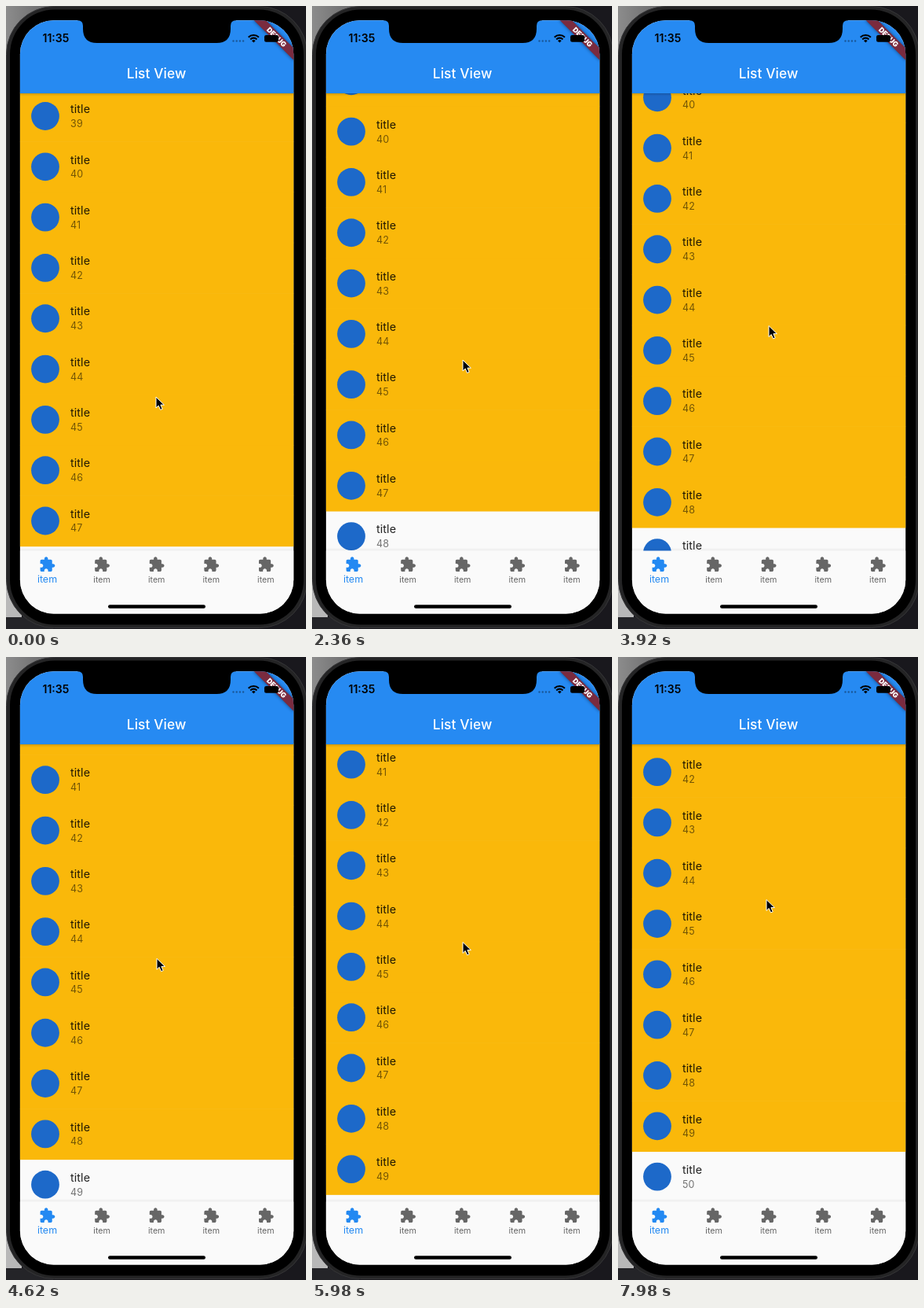
Recreate the animation shown at these times as an HTML page. Size 382x792 px, loop 8 s.

```html
<!DOCTYPE html>
<html lang="en">
<head>
<meta charset="utf-8">
<title>List View</title>
<style>
  html, body { margin: 0; width: 100%; height: 100%; overflow: hidden; background: #19181d; }
  svg { display: block; width: 382px; height: 792px; font-family: Inter, Roboto, sans-serif; }
  .title { font-size: 14.3px; letter-spacing: .1px; fill: #000; fill-opacity: .87; }
  .number { font-size: 12.5px; letter-spacing: .2px; fill: #000; fill-opacity: .54; }
  .tab { font-size: 10.7px; fill: #666; text-anchor: middle; }
  .tab.active { font-size: 12.5px; fill: #2389f2; }
</style>
</head>
<body>
<svg viewBox="0 0 382 792">
  <defs>
    <clipPath id="screen"><rect x="17.9" y="18.2" width="348.3" height="754.4" rx="43"/></clipPath>
    <clipPath id="viewport"><rect x="17" y="110" width="350" height="583"/></clipPath>
    <linearGradient id="barShadow" x2="0" y2="1">
      <stop stop-opacity=".2"/><stop offset=".4" stop-opacity=".08"/><stop offset="1" stop-opacity="0"/>
    </linearGradient>
    <linearGradient id="navShadow" x2="0" y2="1">
      <stop stop-opacity="0"/><stop offset="1" stop-opacity=".06"/>
    </linearGradient>
    <linearGradient id="wall" x2="1" y2="0">
      <stop stop-color="#8c8c8c"/><stop offset="1" stop-color="#3c3c3e"/>
    </linearGradient>
    <filter id="soft" x="-30%" y="-60%" width="160%" height="220%"><feGaussianBlur stdDeviation="2"/></filter>
    <path id="puzzle" d="M20.5 11H19V7c0-1.1-.9-2-2-2h-4V3.5C13 2.12 11.88 1 10.5 1S8 2.12 8 3.5V5H4c-1.1 0-2 .9-2 2v3.8h1.5c1.49 0 2.7 1.21 2.7 2.7s-1.21 2.7-2.7 2.7H2V20c0 1.1.9 2 2 2h3.8v-1.5c0-1.49 1.21-2.7 2.7-2.7s2.7 1.21 2.7 2.7V22H17c1.1 0 2-.9 2-2v-4h1.5c1.38 0 2.5-1.12 2.5-2.5S21.88 11 20.5 11z"/>
  </defs>

  <!-- desktop and phone body -->
  <rect width="124" height="60" fill="url(#wall)"/>
  <rect y="60" width="20" height="717" fill="#b8b8b8"/>
  <rect y="777" width="60" height="15" fill="#242428"/>
  <rect x=".5" y=".5" width="383" height="790" rx="61" fill="#242425" stroke="#363638"/>
  <rect x="5" y="4.5" width="374" height="782" rx="57"/>

  <g clip-path="url(#screen)">
    <rect x="17" y="18" width="350" height="756" fill="#fafafa"/>
    <g id="list" clip-path="url(#viewport)"></g>

    <rect x="17" y="111" width="350" height="4" fill="url(#barShadow)"/>
    <rect x="17" y="18" width="350" height="93" fill="#268af2"/>
    <text x="191.6" y="92" font-size="17.3" font-weight="500" letter-spacing=".1" fill="#fff" text-anchor="middle">List View</text>

    <rect x="17" y="688.5" width="350" height="4" fill="url(#navShadow)"/>
    <rect x="17" y="692.5" width="350" height="81" fill="#fafafa"/>
    <g id="tabs"></g>
    <rect x="130" y="761.2" width="124" height="4.6" rx="2.3"/>

    <g transform="translate(366 18) rotate(45)">
      <rect x="-36" y="25" width="72" height="10.7" filter="url(#soft)" opacity=".5"/>
      <rect x="-52" y="25" width="104" height="10.7" fill="#7a2b3f"/>
      <text y="33.6" font-size="9" font-weight="900" fill="#fff" text-anchor="middle">DEBUG</text>
    </g>

    <text x="46.5" y="46" font-size="14" font-weight="600">11:35</text>
    <g fill="#1a589b">
      <circle cx="289.5" cy="44.5" r="1.2"/><circle cx="293.7" cy="44.5" r="1.2"/>
      <circle cx="297.9" cy="44.5" r="1.2"/><circle cx="302.1" cy="44.5" r="1.2"/>
    </g>
    <g fill="none" stroke="#000" stroke-width="2.1">
      <path d="M308.7 39.8a9.3 9.3 0 0 1 13.2 0M311.2 42.4a5.7 5.7 0 0 1 8.2 0"/>
    </g>
    <path d="M315.3 46.6l-2.3-2.4a3.3 3.3 0 0 1 4.6 0z"/>
    <rect x="329" y="37" width="18" height="8.8" rx="2.2"/>
  </g>

  <path d="M91 17v1.2q7 0 7 7V29q0 18 18 18h152q18 0 18-18v-3.8q0-7 7-7V17z"/>

  <g id="cursor">
    <path d="M0 0v14l3.200-3 2.400 5.400 2.600-1.100-2.300-5.200h4.500z" stroke="#fff" stroke-linejoin="round"/>
  </g>
</svg>

<script>
const LOOP = 8000, PITCH = 64.31, FIRST = 39, LAST = 51, NAV_TOP = 692;
const byId = id => document.getElementById(id);

function add(parent, tag, attrs, text) {
  const node = document.createElementNS('http://www.w3.org/2000/svg', tag);
  for (const key in attrs) node.setAttribute(key, attrs[key]);
  if (text !== undefined) node.textContent = text;
  return parent.appendChild(node);
}

// Fills overlap the next row slightly so that no seam shows.
const rows = [];
for (let n = FIRST; n <= LAST; n++) {
  const group = add(byId('list'), 'g', {});
  const fill = add(group, 'rect', { x: 17, y: -PITCH / 2, width: 350, height: PITCH + .6, fill: '#fab80a' });
  add(group, 'circle', { cx: 50, cy: 0, r: 17.9, fill: '#1d69c9' });
  add(group, 'text', { class: 'title', x: 82, y: -3.8 }, 'title');
  add(group, 'text', { class: 'number', x: 82, y: 14 }, n);
  rows.push({ group, fill });
}

for (let i = 0; i < 5; i++) {
  const x = 52.5 + i * 69.6;
  const tab = add(byId('tabs'), 'g', { class: i ? 'tab' : 'tab active' });
  add(tab, 'use', { href: '#puzzle', transform: `translate(${x - 10.7} 699.4) scale(.892)` });
  add(tab, 'text', { x, y: 732.8 }, 'item');
}

// step, list offset, pointer x, pointer y
const drag = [
  [0, 0, 191, 497],
  [30, -24.8, 192, 471.3],
  [69, -63.6, 192, 429.8],
  [99, -112.4, 192, 383.3],
  [127, -132, 192, 362.5],
  [142, -160.1, 192, 333.5],
  [171, -186.8, 189, 308.5]
];

function poseAt(step) {
  let i = 1;
  while (i < drag.length - 1 && step > drag[i][0]) i++;
  const a = drag[i - 1], b = drag[i];
  const p = (step - a[0]) / (b[0] - a[0]);
  return a.map((v, k) => v + (b[k] - v) * p);
}

// The picture advances three steps every 140 ms: held 100, 20 and 20 ms.
function stepAt(ms) {
  const rest = ms % 140;
  return 3 * Math.floor(ms / 140) + (rest >= 100) + (rest >= 120);
}

function draw(now) {
  const [, offset, x, y] = poseAt(stepAt(now % LOOP));
  rows.forEach(({ group, fill }, i) => {
    const center = 140 + offset + i * PITCH;
    group.setAttribute('transform', `translate(0 ${center})`);
    // a row is coloured once it has come fully into view
    fill.setAttribute('visibility', center + PITCH / 2 <= NAV_TOP ? 'visible' : 'hidden');
  });
  byId('cursor').setAttribute('transform', `translate(${x} ${y})`);
}

const start = performance.now();
function tick() {
  draw(performance.now() - start);
  requestAnimationFrame(tick);
}
tick();
</script>
</body>
</html>
```
